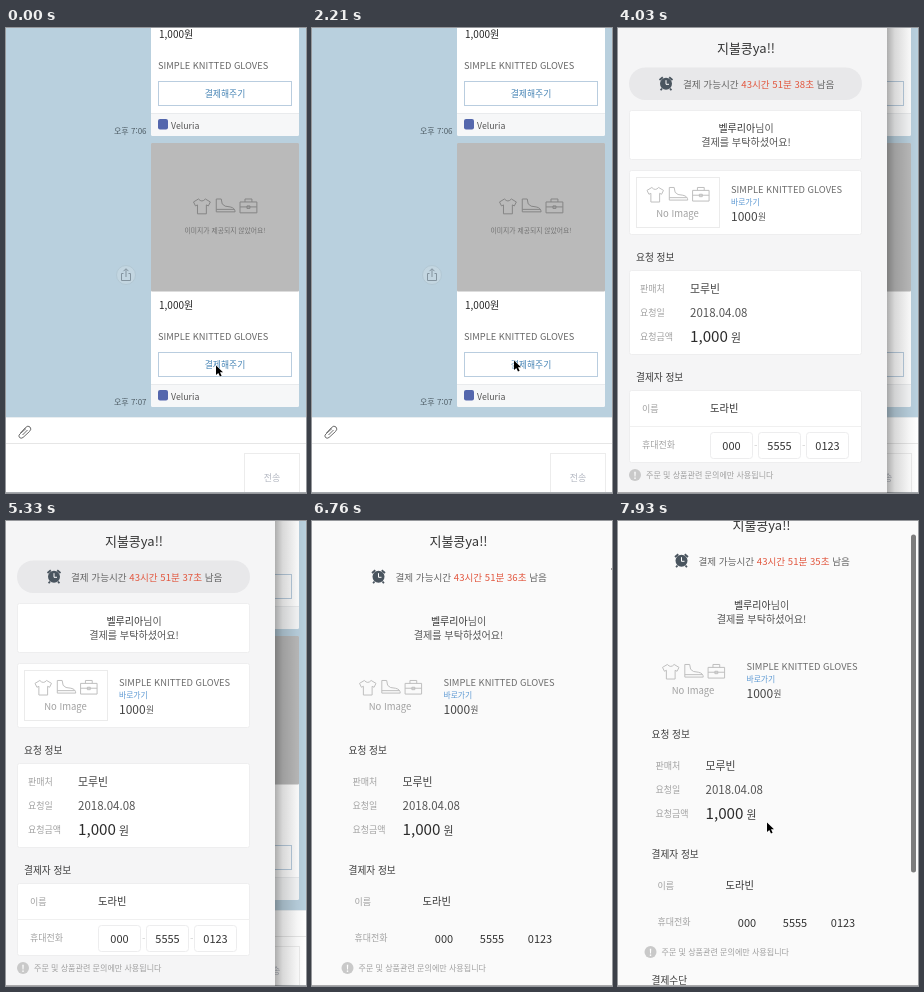
An HTML page for the animation above (8 s loop, 300 by 465 pixels).

```html
<!DOCTYPE html>
<html lang="ko">
<head>
<meta charset="utf-8">
<title>Payment request</title>
<style>
html, body { margin: 0; width: 100%; height: 100%; overflow: hidden; background: #fff; }
svg { display: block; width: 300px; height: 465px; }
text { font-family: "Noto Sans CJK KR", "Noto Sans CJK", "Noto Sans", sans-serif; white-space: pre; }
.wide .frame { visibility: hidden; }
</style>
</head>
<body>
<svg id="stage" viewBox="0 0 300 465" xmlns="http://www.w3.org/2000/svg"></svg>
<script>
const PRODUCT = 'SIMPLE KNITTED GLOVES';
const stage = document.getElementById('stage');

function el(parent, tag, attrs = {}, content = '') {
  const node = document.createElementNS('http://www.w3.org/2000/svg', tag);
  for (const key in attrs) node.setAttribute(key, attrs[key]);
  node.textContent = content;
  return parent.appendChild(node);
}
const group = (parent, attrs) => el(parent, 'g', attrs);
const rect = (parent, x, y, width, height, fill, more) =>
  el(parent, 'rect', { x, y, width, height, fill, ...more });
const path = (parent, d, stroke, more) =>
  el(parent, 'path', { d, stroke, fill: 'none', ...more });
const label = (parent, x, y, size, fill, str, more) =>
  el(parent, 'text', { x, y, 'font-size': size, fill, ...more }, str);
const mid = { 'text-anchor': 'middle' };
const bold = { 'font-weight': 500 };

// Shirt, boot and bag outlines
function goods(parent, x, y, scale, stroke) {
  const g = group(parent, { transform: `translate(${x} ${y}) scale(${scale})`, 'stroke-linejoin': 'round' });
  path(g, 'M5 1L0 4L2 8L4 7V16H13V7L15 8L17 4L12 1Q8.5 5 5 1Z', stroke);
  path(g, 'M23 1H28L29 6Q31 9 37 9Q42 10 42 14H23ZM23 11.5H41', stroke);
  path(g, 'M47 4H64V15H47ZM52 4V1H59V4M47 9H64M54 8H57V10.5H54Z', stroke);
}

function chatCard(parent, y) {
  const g = group(parent, { transform: `translate(0 ${y})` });
  rect(g, 145, 0, 148, 264, '#fff', { rx: 2 });
  rect(g, 145, 0, 148, 148.5, '#bababa', { rx: 1 });
  goods(g, 187.5, 55, 0.99, '#858585');
  label(g, 219, 89.5, 6.8, '#727272', '이미지가 제공되지 않았어요!', mid);
  label(g, 153, 166, 10, '#222', '1,000원', bold);
  label(g, 152, 196.5, 9.3, '#666', PRODUCT);
  rect(g, 152.5, 209.5, 133, 24, '#fff', { stroke: '#b9cddf' });
  label(g, 219, 225, 8.8, '#4583b4', '결제해주기', mid);
  rect(g, 145, 241, 148, 23, '#f6f7f8', { rx: 2 });
  rect(g, 145, 241, 148, 1, '#e9ebed');
  rect(g, 152, 247, 10, 10.5, '#5467ad', { rx: 2 });
  label(g, 165, 256.5, 8.8, '#555', 'Veluria');
}

function buildChat() {
  const g = group(stage);
  rect(g, 0, 0, 300, 465, '#b9d0de');
  chatCard(g, -156);
  chatCard(g, 115);
  label(g, 108, 106, 8, '#4f5d66', '오후 7:06');
  label(g, 108, 377, 8, '#4f5d66', '오후 7:07');
  el(g, 'circle', { cx: 120, cy: 247, r: 9.5, fill: '#c3d6e1', stroke: '#b3c8d4' });
  path(g, 'M117.5 245.5H115.5V252.5H124.5V245.5H122.5M120 249V241M117.5 243.2L120 240.7L122.5 243.2', '#83939e');
  rect(g, 0, 389, 300, 76, '#fff');
  rect(g, 0, 389, 300, 1, '#e9eef1');
  rect(g, 0, 415, 300, 1, '#e6e6e6');
  path(g, 'M14.5 405L19.5 399.5Q22 397 24 399Q26 401 23.5 403.5L17 409.5Q15 411 13.5 409.5Q12 408 13.8 406L20 400.5M16.5 407L21.5 402', '#6b6b6b');
  rect(g, 238.5, 425.5, 55, 42, '#fff', { stroke: '#ececec' });
  label(g, 266, 453, 9, '#b4b8c2', '전송', mid);
  rect(g, 0, 464, 300, 1, '#a5a9ad');
}

function buildPage() {
  const g = group(stage);
  const panel = (y, h) => rect(g, 11.5, y + 0.5, 232, h, '#fff', { class: 'frame', rx: 2, stroke: '#eeeeef' });

  label(g, 128, 25, 13, '#333', '지불콩ya!!', { ...mid, ...bold });
  rect(g, 11, 39.5, 233, 32.5, '#e8e8ea', { class: 'frame', rx: 16.2 });

  el(g, 'circle', { cx: 48, cy: 55.8, r: 6, fill: '#4a555f' });
  path(g, 'M41.5 52L44.8 49.2M54.5 52L51.2 49.2M44 60.5L42.6 62.3M52 60.5L53.4 62.3', '#4a555f', { 'stroke-width': 1.8 });
  path(g, 'M48 52.2V56.3H51', '#fff');
  const line = label(g, 65, 60, 9.6, '#666', '');
  el(line, 'tspan', {}, '결제 가능시간 ');
  const clock = el(line, 'tspan', { fill: '#e2573f' });
  el(line, 'tspan', {}, ' 남음');

  panel(82, 49);
  const who = label(g, 128, 104, 10, '#555', '', mid);
  el(who, 'tspan', { ...bold, fill: '#333' }, '벨루리아');
  el(who, 'tspan', {}, '님이');
  label(g, 128, 117.5, 10.1, '#555', '결제를 부탁하셨어요!', mid);

  panel(142, 64);
  rect(g, 18.5, 149.5, 83, 50, '#fff', { class: 'frame', stroke: '#ebebeb' });
  goods(g, 29, 158.5, 0.97, '#bdbdbd');
  label(g, 59.5, 188.5, 9.5, '#a2a2a2', 'No Image', { ...mid, ...bold });
  label(g, 113, 165, 9.4, '#6c6c6c', PRODUCT);
  label(g, 113, 177, 7.8, '#5a97d2', '바로가기');
  label(g, 113, 192.5, 12, '#444', '1000');
  label(g, 140, 192, 8.6, '#555', '원');

  label(g, 18, 232.5, 9.7, '#3c3c3c', '요청 정보', bold);
  panel(242, 84);
  [['판매처', 264], ['요청일', 288], ['요청금액', 312]].forEach(([s, y]) => label(g, 22, y, 9, '#a3a3a3', s));
  label(g, 72, 265, 10.9, '#444', '모루빈');
  label(g, 72, 289, 11.5, '#555', '2018.04.08');
  label(g, 72, 314, 15.2, '#2b2b2b', '1,000');
  label(g, 113, 313.5, 10.8, '#3c3c3c', '원');

  label(g, 18, 352.5, 9.7, '#3c3c3c', '결제자 정보', bold);
  panel(362, 72);
  rect(g, 12, 398, 232, 1, '#f0f0f0', { class: 'frame' });
  label(g, 24, 384, 9, '#a3a3a3', '이름');
  label(g, 92, 384, 10.3, '#333', '도라빈');
  label(g, 24, 420, 9, '#a3a3a3', '휴대전화');
  [[92.5, '000'], [140.5, '5555'], [188.5, '0123']].forEach(([x, s], i) => {
    rect(g, x, 404.5, 42, 26, '#fff', { class: 'frame', rx: 3, stroke: '#ededee' });
    if (i) rect(g, x - 4, 417, 2.5, 1, '#ddd', { class: 'frame' });
    label(g, x + 21, 421.5, 11, '#333', s, mid);
  });
  el(g, 'circle', { cx: 17, cy: 447, r: 6, fill: '#c9c9c9' });
  label(g, 17, 450.5, 9.5, '#fff', '!', { ...mid, 'font-weight': 700 });
  label(g, 28, 450, 8.05, '#a0a0a0', '주문 및 상품관련 문의에만 사용됩니다');
  label(g, 18, 479, 9.7, '#3c3c3c', '결제수단', bold);
  return { g, clock };
}

buildChat();
const fade = el(el(stage, 'defs'), 'linearGradient', { id: 'fade' });
[[0, 0.32], [0.25, 0.15], [0.7, 0.04], [1, 0]].forEach(([offset, o]) => el(fade, 'stop', { offset, 'stop-opacity': o }));
const shade = rect(stage, 0, 0, 31, 465, 'url(#fade)');
const sheet = rect(stage, 0, 0, 300, 465, '#f5f5f6');
const page = buildPage();
const floor = rect(stage, 0, 464, 300, 1, '#5d6f7d');
const thumb = rect(stage, 293, 0, 5, 338, '#7c7c7c', { rx: 2.5 });
const arrow = path(stage, 'M0 0V9.5L2.3 7.5L4 11L5.6 10.2L4 6.8H7Z', '#fff', { fill: '#000', 'stroke-width': 0.9, 'paint-order': 'stroke' });
const sizer = path(stage, 'M-7 0L-4 -2.5V-0.7H4V-2.5L7 0L4 2.5V0.7H-4V2.5Z', '#fff', { fill: '#000', 'stroke-width': 0.8, 'paint-order': 'stroke' });

const STEP = 130, LOOP = 8000;
const OPEN = 2600, LOADED = 2990, GRAB = 5460, FREE = 6890, SCROLL = 7410;
const TICKS = [4940, 5980, 6890];
const NARROW = 269;

// Rows: time, then values
const POINTER = [
  [0, 210, 337.5], [1040, 210, 337.5], [1820, 202, 332.5], [2470, 202, 332.5],
  [2860, 187, 151], [2990, 220, 125], [3250, 320, 60], [6760, 304, 48],
  [7150, 205, 225], [7410, 149, 301.5]
];
const EDGE = [[5850, NARROW], [6370, 306]];
const OFFSET = [[7410, 0], [7540, 2], [7670, 6], [7800, 11], [7930, 16]];

function sample(rows, t) {
  const i = rows.findIndex(row => row[0] > t);
  if (i === 0) return rows[0].slice(1);
  if (i < 0) return rows[rows.length - 1].slice(1);
  const a = rows[i - 1], b = rows[i], k = (t - a[0]) / (b[0] - a[0]);
  return a.slice(1).map((v, j) => v + (b[j + 1] - v) * k);
}
const show = (node, on) => node.setAttribute('visibility', on ? 'visible' : 'hidden');
const move = (node, x, y) => node.setAttribute('transform', `translate(${x} ${y})`);

function draw(time) {
  const t = Math.floor(time / STEP) * STEP;
  const opened = t >= OPEN, loaded = t >= LOADED, scrolling = t >= SCROLL;
  const [edge] = sample(EDGE, t), [top] = sample(OFFSET, t), [x, y] = sample(POINTER, t);
  const wide = edge > 300;
  const width = loaded ? Math.min(edge, 300) : 300;

  show(sheet, opened);
  sheet.setAttribute('width', width);
  sheet.setAttribute('fill', !loaded ? '#f8faf9' : wide ? '#fafafa' : '#f5f5f6');
  show(shade, loaded && !wide);
  move(shade, edge, 0);
  show(floor, opened);
  floor.setAttribute('width', width);
  floor.setAttribute('fill', loaded ? '#a9a9ab' : '#5d6f7d');

  page.g.style.display = loaded ? '' : 'none';
  page.g.setAttribute('class', wide ? 'wide' : '');
  move(page.g, (edge - NARROW) / 2 - (scrolling ? 3 : 0), -top);
  page.clock.textContent = `43시간 51분 ${38 - TICKS.filter(k => t >= k).length}초`;

  show(thumb, scrolling);
  move(thumb, 0, 2 + top * 0.72);
  show(arrow, t < 3250 || t >= FREE);
  move(arrow, x, y);
  show(sizer, t >= GRAB && t < FREE);
  move(sizer, edge, 48);
}

const start = performance.now();
function tick() {
  draw((performance.now() - start) % LOOP);
  requestAnimationFrame(tick);
}
tick();
</script>
</body>
</html>
```
